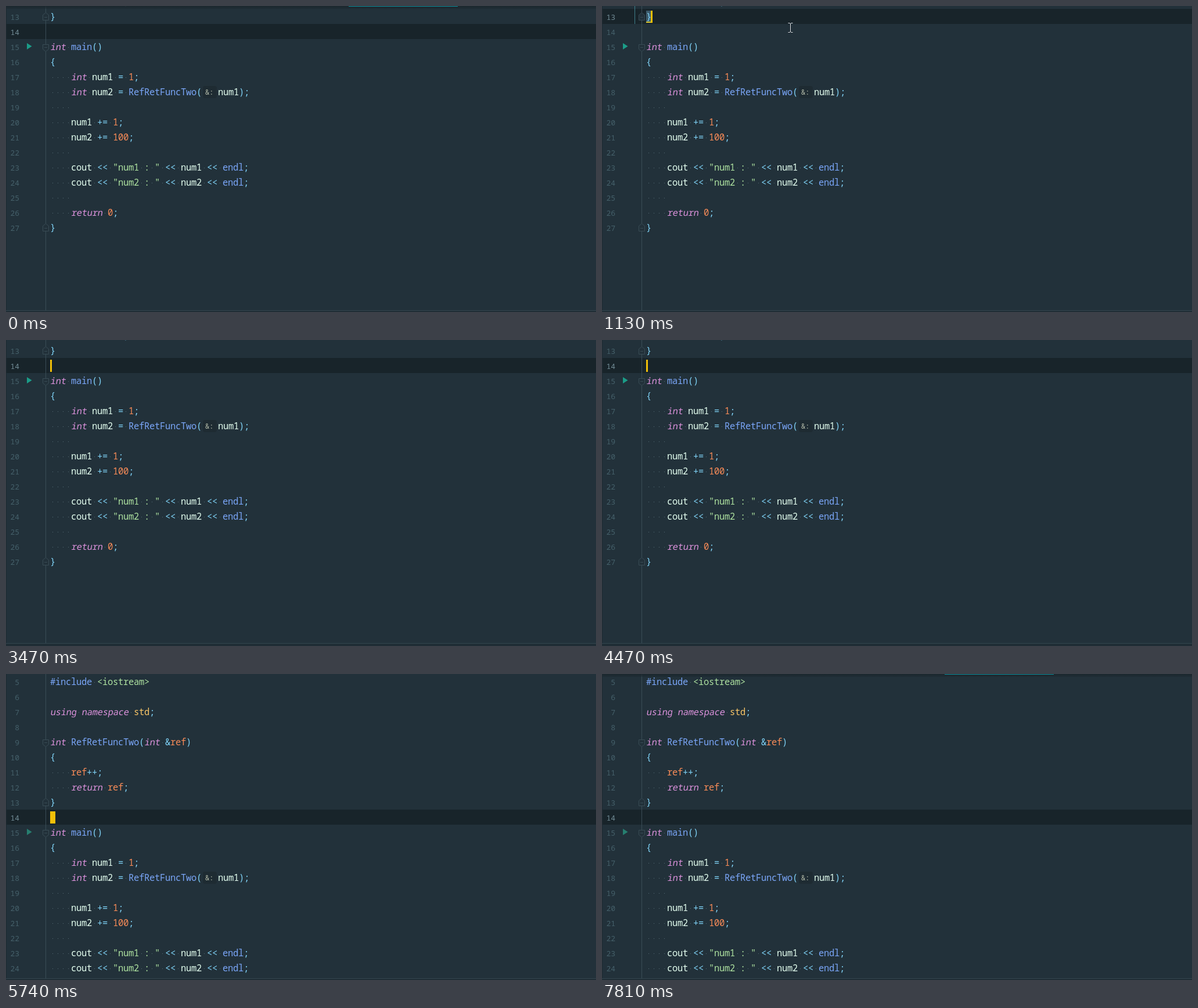
Animation of 1016 by 528 pixels, one loop 7870 ms. Source, as an HTML page:

```html
<!DOCTYPE html>
<html lang="en">
<head>
<meta charset="utf-8">
<title>Code editor</title>
<style>
html, body { margin: 0; width: 100%; height: 100%; overflow: hidden; background: #22313a; }
svg { display: block; width: 1016px; height: 528px; }
text { font: 500 15.5px "Noto Sans Mono", "DejaVu Sans Mono", monospace; letter-spacing: -.3px; font-variant-ligatures: none; }
.kw { fill: #dc92dc; }
.fn { fill: #7aa6f8; }
.op { fill: #80d4f8; }
.str { fill: #aee2a0; }
.num { fill: #fa8c58; }
.std { fill: #fac667; }
.var { fill: #e4fff0; }
.no { font-size: 13px; font-weight: 400; letter-spacing: 0; fill: #45606a; text-anchor: end; }
.no.on { fill: #718b95; }
.hint { font-size: 12px; letter-spacing: 0; fill: #b3bba9; }
.dot { fill: #566e78; }
.fold { fill: #22313a; stroke: #394c55; }
</style>
</head>
<body>
<svg id="stage" viewBox="0 0 1016 528"></svg>
<script>
const LOOP = 7870, ROW = 26, COL = 9, LEFT = 76, FIRST = 5, TICK = 200 / 3;
const stage = document.getElementById('stage');

const code = `#include <iostream>

using namespace std;

int RefRetFuncTwo(int &ref)
{
    ref++;
    return ref;
}

int main()
{
    int num1 = 1;
    int num2 = RefRetFuncTwo(num1);
    
    num1 += 1;
    num2 += 100;
    
    cout << "num1 : " << num1 << endl;
    cout << "num2 : " << num2 << endl;
    
    return 0;
}`.split('\n');

const kinds = [
  ['str', /^("[^"]*"|<iostream>)/],
  ['kw', /^(int|using|namespace|return)\b/],
  ['fn', /^(#include|RefRetFuncTwo|main|endl)/],
  ['std', /^std\b/],
  ['num', /^(ref|\d+)/],
  ['var', /^\w+/],
  ['op', /^[^\s\w"]+/]
];

function add(parent, tag, attrs, text) {
  const el = document.createElementNS('http://www.w3.org/2000/svg', tag);
  for (const k in attrs) el.setAttribute(k, attrs[k]);
  if (text) el.textContent = text;
  parent.appendChild(el);
  return el;
}
const rect = (parent, x, y, width, height, fill) =>
  add(parent, 'rect', { x, y, width, height, fill });
const show = (el, on) => el.setAttribute('visibility', on ? 'visible' : 'hidden');
const rowY = n => (n - FIRST) * ROW;

rect(stage, 0, 0, 1016, 528, '#22313a');
const page = add(stage, 'g', {});
const band = rect(page, 1, 0, 1015, ROW, '#18242a');
const gutter = rect(stage, 68, 0, 1, 525, '#3a4c55');
const sheet = add(stage, 'g', {});
const brace = add(sheet, 'g', {});
rect(brace, 76, rowY(13) + 3, 9, 21, '#3d5b6b');
rect(brace, 76, rowY(13) + 22, 9, 2, '#d9c52c');
rect(brace, 56, rowY(13) - 5, 1, 31, '#3f7f8a');

function drawLine(line, top) {
  let rest = line, x = LEFT;
  const put = (word, kind) => {
    for (const part of word.match(/ |[^ ]+/g)) {
      // keywords lean by a fixed angle around their baseline
      const lean = kind === 'kw' ? ' skewX(-9)' : '';
      if (part === ' ') add(sheet, 'rect', { x: x + 4, y: top + 14, width: 1, height: 1, class: 'dot' });
      else add(sheet, 'text', { transform: `translate(${x} ${top + 19})${lean}`, class: kind }, part);
      x += part.length * COL;
    }
  };
  while (rest) {
    if (rest[0] === ' ') {
      put(' ');
      rest = rest.slice(1);
      continue;
    }
    const [kind, rule] = kinds.find(k => k[1].test(rest));
    const word = rest.match(rule)[0];
    // the parameter hint sits between the bracket and its argument
    if (rest.startsWith('(num1')) {
      put('(', kind);
      add(sheet, 'rect', { x: x + 2, y: top + 3, width: 24, height: 21, rx: 4, fill: '#1e2b32' });
      add(sheet, 'text', { x: x + 6, y: top + 18, class: 'hint' }, '&:');
      x += 28;
      rest = rest.slice(1);
      continue;
    }
    put(word, kind);
    rest = rest.slice(word.length);
  }
}

function drawFold(n, end) {
  const y = rowY(n) + (end ? 6.5 : 9.5);
  const d = end
    ? `M63.5 ${y + 13}V${y + 4}L68.5 ${y}L73.5 ${y + 4}V${y + 13}Z`
    : `M63.5 ${y}H73.5V${y + 8}L68.5 ${y + 12}L63.5 ${y + 8}Z`;
  add(sheet, 'path', { d, class: 'fold' });
  const m = y + (end ? 8 : 5);
  add(sheet, 'path', { d: `M66 ${m}H71`, class: 'fold' });
}

const numbers = code.map((line, i) => {
  const n = FIRST + i;
  drawLine(line, rowY(n));
  return add(sheet, 'text', { x: 23, y: rowY(n) + 19, class: 'no' }, String(n));
});
[9, 15].forEach(n => drawFold(n, false));
[13, 27].forEach(n => drawFold(n, true));
const play = add(sheet, 'path', { d: `M36 ${rowY(15) + 7}L44.5 ${rowY(15) + 12.5}L36 ${rowY(15) + 18}Z` });
const caret = rect(sheet, LEFT, 0, 3, 21, '#f2c008');

// window edges
rect(stage, 0, 0, 1, 528, '#1d2a31');
const footer = add(stage, 'g', {});
rect(footer, 0, 0, 1016, 1, '#34464f');
rect(footer, 0, 1, 1016, 4, '#1f2d35');
const tab = add(stage, 'g', {});
const shade = add(add(stage, 'defs', {}), 'linearGradient', { id: 'shade', x2: 0, y2: 1 });
add(shade, 'stop', { offset: 0, 'stop-color': '#1a262c', 'stop-opacity': .9 });
add(shade, 'stop', { offset: 1, 'stop-color': '#1a262c', 'stop-opacity': .35 });
rect(tab, 1, 0, 1015, 5, 'url(#shade)');
rect(tab, 590, 0, 188, 1, '#0c8f9c');

const mouse = add(stage, 'g', { fill: 'none' });
const beam = 'M-3.5 -7.5H-1L.5 -6.5L2 -7.5H4.5M.5 -6.5V7.5M-3.5 8.5H-1L.5 7.5L2 8.5H4.5';
add(mouse, 'path', { d: beam, stroke: '#16212a', 'stroke-width': 2.4 });
add(mouse, 'path', { d: beam, stroke: '#e3e9ec' });

const path = [[330, 861, 136], [600, 560, 84], [800, 372, 51], [930, 335, 24],
  [1060, 335, 24], [1130, 324, 37], [1400, 310, 50], [1660, 310, 50]];
const blinks = [[260, 730], [1060, 1930], [2460, 2930], [3470, 3940], [4470, 5200],
  [5740, 6210], [6740, 7280], [7740, 7810]];
const within = (t, a, b) => t >= a && t < b;

function mouseAt(t) {
  const i = Math.max(1, path.findIndex(p => p[0] >= t));
  const [t0, x0, y0] = path[i - 1], [t1, x1, y1] = path[i];
  const k = Math.min(1, Math.max(0, (t - t0) / (t1 - t0)));
  return [Math.round(x0 + (x1 - x0) * k), Math.round(y0 + (y1 - y0) * k)];
}

function draw(t) {
  const up = t >= 5740;
  const row = within(t, 1060, 1400) ? 13 : 14;
  const insert = within(t, 1060, 4600);
  const scroll = `translate(0 ${up ? 0 : -203})`;
  page.setAttribute('transform', scroll);
  sheet.setAttribute('transform', scroll);
  band.setAttribute('y', rowY(row));
  numbers.forEach((el, i) => el.setAttribute('class', i + FIRST === row ? 'no on' : 'no'));
  show(brace, row === 13);
  play.setAttribute('fill', up ? '#277f70' : '#1b9d88');

  show(caret, blinks.some(b => within(t, b[0], b[1])));
  caret.setAttribute('x', row === 13 ? 84 : LEFT);
  caret.setAttribute('y', rowY(row) + 3);
  caret.setAttribute('width', insert ? 3 : COL);

  show(tab, t < 930 || within(t, 4670, 5740) || t >= 7810);
  const foot = within(t, 1660, 4670) ? 523 : 525;
  footer.setAttribute('transform', `translate(0 ${foot})`);
  gutter.setAttribute('height', foot);

  const seen = within(t, 330, 1600);
  show(mouse, seen);
  if (seen) {
    const tick = Math.floor((t + 5) / TICK) * TICK;
    mouse.setAttribute('transform', `translate(${mouseAt(tick)})`);
  }
}

function loop() {
  draw(performance.now() % LOOP);
  requestAnimationFrame(loop);
}
loop();
</script>
</body>
</html>
```
